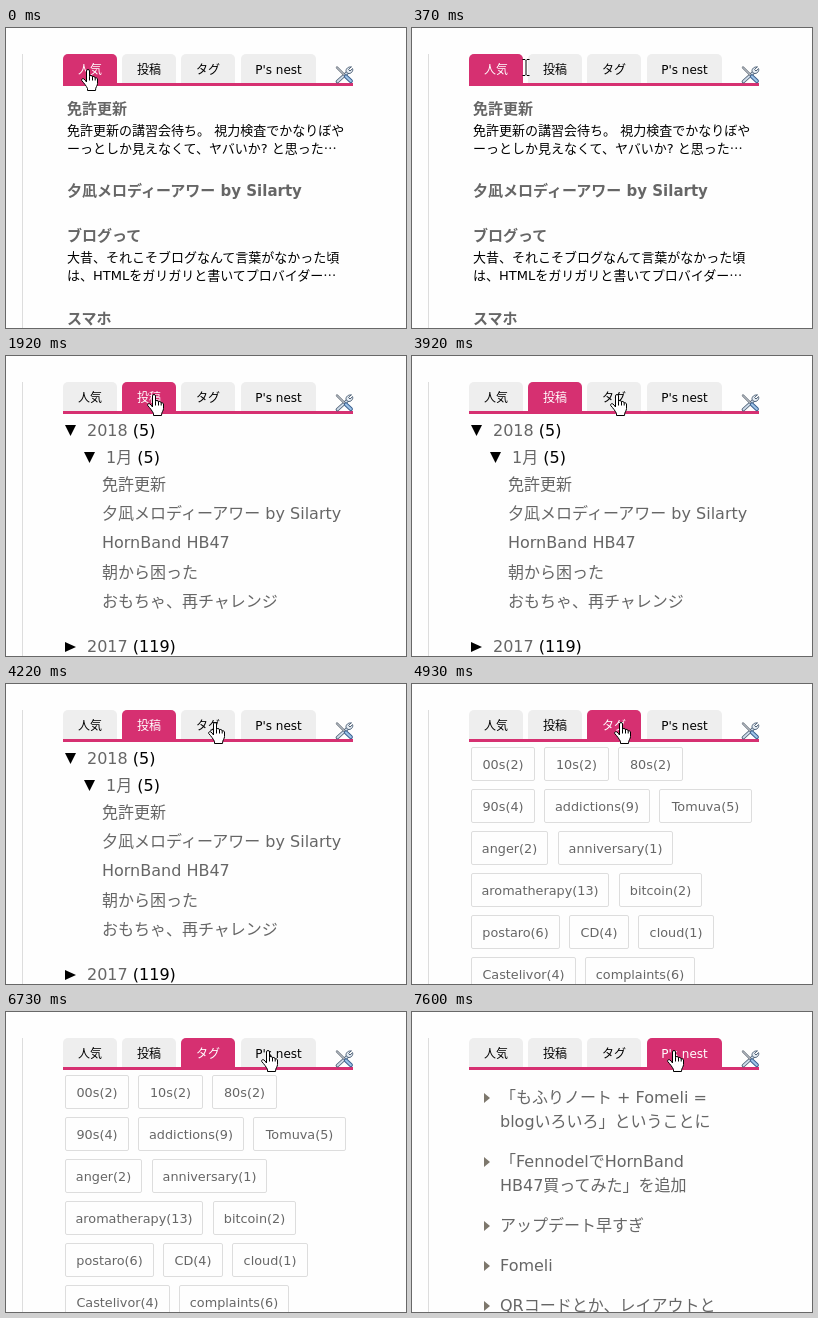
Animation, 400 px wide and 300 px high, one loop 8000 ms. Source, as an HTML page:

```html
<!DOCTYPE html>
<html lang="ja">
<head>
<meta charset="utf-8">
<title>Sidebar tabs</title>
<style>
html, body { margin: 0; width: 100%; height: 100%; overflow: hidden; background: #fefefe; }
#stage {
  position: relative; width: 400px; height: 300px; overflow: hidden;
  font-family: "DejaVu Sans", "Noto Sans CJK JP", "Noto Sans CJK", sans-serif;
  color: #666;
}
#stage * { position: absolute; box-sizing: border-box; }
#stage .dots { position: static; font-family: "Noto Sans CJK JP", "Noto Sans CJK", sans-serif; line-height: 0; }
#stage b { position: static; font-weight: normal; color: #000; }
.view { inset: 0; opacity: 0; }
.rail { left: 16px; top: 26px; width: 1px; height: 274px; background: #ddd; }
.bar { left: 57px; top: 55px; width: 290px; height: 3px; background: #d63071; }
.tab {
  top: 26px; height: 29px; line-height: 32px; border-radius: 5px 5px 0 0;
  background: #eee; color: #000; font-size: 12px; text-align: center; white-space: nowrap;
}
.tab.on { background: #d63071; color: #fff; }
.line { line-height: 22px; white-space: nowrap; }
.head { font-size: 15px; font-weight: bold; }
.body { font-size: 13px; color: #000; }
.item { font-size: 16px; }
.tag {
  height: 34px; line-height: 34px; border: 1px solid #ddd; border-radius: 2px;
  font-size: 12.8px; text-align: center; white-space: nowrap;
}
.down { clip-path: polygon(0 0, 100% 0, 50% 100%); }
.right { clip-path: polygon(0 0, 100% 50%, 0 100%); }
svg { left: 0; top: 0; overflow: visible; }

#popular, #posts, #tags, #links, #hand, #beam { animation: 8s step-end infinite; }
#popular { animation-name: popular; }
#posts { animation-name: posts; }
#tags { animation-name: tags; }
#links { animation-name: links; }
#hand { animation-name: move, swap; }
#beam { left: 110px; top: 31px; animation-name: beam; }
@keyframes popular { 0% { opacity: 1 } 24%, 100% { opacity: 0 } }
@keyframes posts { 0% { opacity: 0 } 24% { opacity: 1 } 61.625%, 100% { opacity: 0 } }
@keyframes tags { 0% { opacity: 0 } 61.625% { opacity: 1 } 95%, 100% { opacity: 0 } }
@keyframes links { 0% { opacity: 0 } 95%, 100% { opacity: 1 } }
@keyframes swap { 0% { opacity: 1 } 4.625% { opacity: 0 } 6.5%, 100% { opacity: 1 } }
@keyframes beam { 0% { opacity: 0 } 4.625% { opacity: 1 } 6.5%, 100% { opacity: 0 } }
@keyframes move {
  0% { transform: translate(75px, 41px) }
  3.125% { transform: translate(94px, 40px) }
  6.5% { transform: translate(121px, 38px) }
  10% { transform: translate(141px, 38px) }
  49% { transform: translate(198px, 38px) }
  52.75% { transform: translate(202px, 38px) }
  82.375% { transform: translate(249px, 38px) }
  84.125%, 100% { transform: translate(255px, 38px) }
}
</style>
</head>
<body>
<div id="stage">
  <div class="rail"></div>
  <div class="bar"></div>
  <div id="base"></div>
  <div class="view" id="popular"></div>
  <div class="view" id="posts"></div>
  <div class="view" id="tags"></div>
  <div class="view" id="links"></div>

  <svg style="left:329px;top:38px" width="19" height="18" fill="none" stroke-linecap="round">
    <path d="M2.5 15.5L13 6" stroke="#4d6076" stroke-width="3.6"/>
    <path d="M2.5 15.5L13 6" stroke="#cfdcea" stroke-width="1.8"/>
    <path d="M16 1L13.6 3.6L15 5L17.6 2.6C18.4 5.5 16 8 13 7.4L11 5.6C10.6 2.6 13.5 .4 16 1Z" fill="#e4ebf2" stroke="#4d6076"/>
    <path d="M2 1.500L10 9.500" stroke="#5a6470" stroke-width="2.4"/>
    <path d="M2 1.500L10 9.500" stroke="#eef1f4"/>
    <path d="M11 10.500L15.800 15" stroke="#3a5f8f" stroke-width="4.2"/>
    <path d="M11 10.500L15.800 15" stroke="#9cc3e8" stroke-width="2.2"/>
  </svg>

  <svg id="beam" width="8" height="17" fill="none">
    <path d="M.5 .5H3L4 1.5L5 .5H7.5M4 1.5V15.5M.5 16.5H3L4 15.5L5 16.5H7.5" stroke="#000"/>
  </svg>
  <svg id="hand" width="17" height="22" stroke="#000" stroke-linejoin="round">
    <path fill="#fff" d="M5.5 13V2Q5.5 .5 7 .5T8.5 2V7.5Q8.5 6.5 10 6.5T11.5 8Q12 7.3 13 7.5T14.2 9Q14.6 8.5 15.4 8.8T16.5 10V14.5Q16.5 16 15.5 17.5T14.5 21.5H6.5V19.5Q5.5 17.5 4 15.5T.7 11.5Q.3 10 1.6 9.7T4 11Z"/>
    <path fill="none" d="M8.5 7.5V11.5M11.5 8V11.5M14.2 9V11.5"/>
  </svg>
</div>
<script>
const box = id => document.getElementById(id);

function add(parent, cls, css, html = "") {
  const el = document.createElement("div");
  el.className = cls;
  el.style.cssText = css;
  el.innerHTML = html.replace("…", '<span class="dots">…</span>');
  box(parent).append(el);
}

// y is the middle of the text line
const line = (parent, cls, x, y, text) =>
  add(parent, "line " + cls, `left:${x}px;top:${y - 10}px`, text);

const arrow = (parent, dir, x, y, w, h, color) =>
  add(parent, dir, `left:${x}px;top:${y}px;width:${w}px;height:${h}px;background:${color}`);

[
  ["popular", 57, 54, "人気"],
  ["posts", 116, 54, "投稿"],
  ["tags", 175, 54, "タグ"],
  ["links", 235, 75, "P's nest"],
].forEach(([view, x, w, label]) => {
  const css = `left:${x}px;width:${w}px`;
  add("base", "tab", css, label);
  add(view, "tab on", css, label);
});

[
  ["head", 80, "免許更新"],
  ["body", 102, "免許更新の講習会待ち。 視力検査でかなりぼや"],
  ["body", 120, "ーっとしか見えなくて、ヤバいか? と思った…"],
  ["head", 162, "夕凪メロディーアワー by Silarty"],
  ["head", 207, "ブログって"],
  ["body", 229, "大昔、それこそブログなんて言葉がなかった頃"],
  ["body", 247, "は、HTMLをガリガリと書いてプロバイダー…"],
  ["head", 290, "スマホ"],
].forEach(([cls, y, text]) => line("popular", cls, 61, y, text));

[
  [81, 74, "2018 <b>(5)</b>"],
  [100, 101, "1月 <b>(5)</b>"],
  [96, 128, "免許更新"],
  [96, 157, "夕凪メロディーアワー by Silarty"],
  [96, 186, "HornBand HB47"],
  [96, 216, "朝から困った"],
  [96, 245, "おもちゃ、再チャレンジ"],
  [81, 290, "2017 <b>(119)</b>"],
].forEach(([x, y, text]) => line("posts", "item", x, y, text));
arrow("posts", "down", 59, 69, 11, 11, "#000");
arrow("posts", "down", 78, 96, 11, 11, "#000");
arrow("posts", "right", 59, 286, 11, 10, "#000");

[
  [[59, 64, "00s(2)"], [132, 65, "10s(2)"], [206, 65, "80s(2)"]],
  [[59, 64, "90s(4)"], [132, 106, "addictions(9)"], [247, 93, "Tomuva(5)"]],
  [[59, 77, "anger(2)"], [146, 115, "anniversary(1)"]],
  [[59, 138, "aromatherapy(13)"], [207, 83, "bitcoin(2)"]],
  [[59, 89, "postaro(6)"], [157, 60, "CD(4)"], [226, 76, "cloud(1)"]],
  [[59, 105, "Castelivor(4)"], [173, 110, "complaints(6)"]],
].forEach((row, i) => row.forEach(([x, w, text]) =>
  add("tags", "tag", `left:${x}px;top:${63 + 42 * i}px;width:${w}px`, text)));

[
  [85, "「もふりノート + Fomeli ="],
  [109, "blogいろいろ」ということに"],
  [149, "「FennodelでHornBand"],
  [173, "HB47買ってみた」を追加"],
  [213, "アップデート早すぎ"],
  [253, "Fomeli"],
  [293, "QRコードとか、レイアウトと"],
].forEach(([y, text]) => line("links", "item", 88, y, text));
[81, 145, 209, 249, 289].forEach(y => arrow("links", "right", 72, y, 6, 10, "#7d776c"));
</script>
</body>
</html>
```
